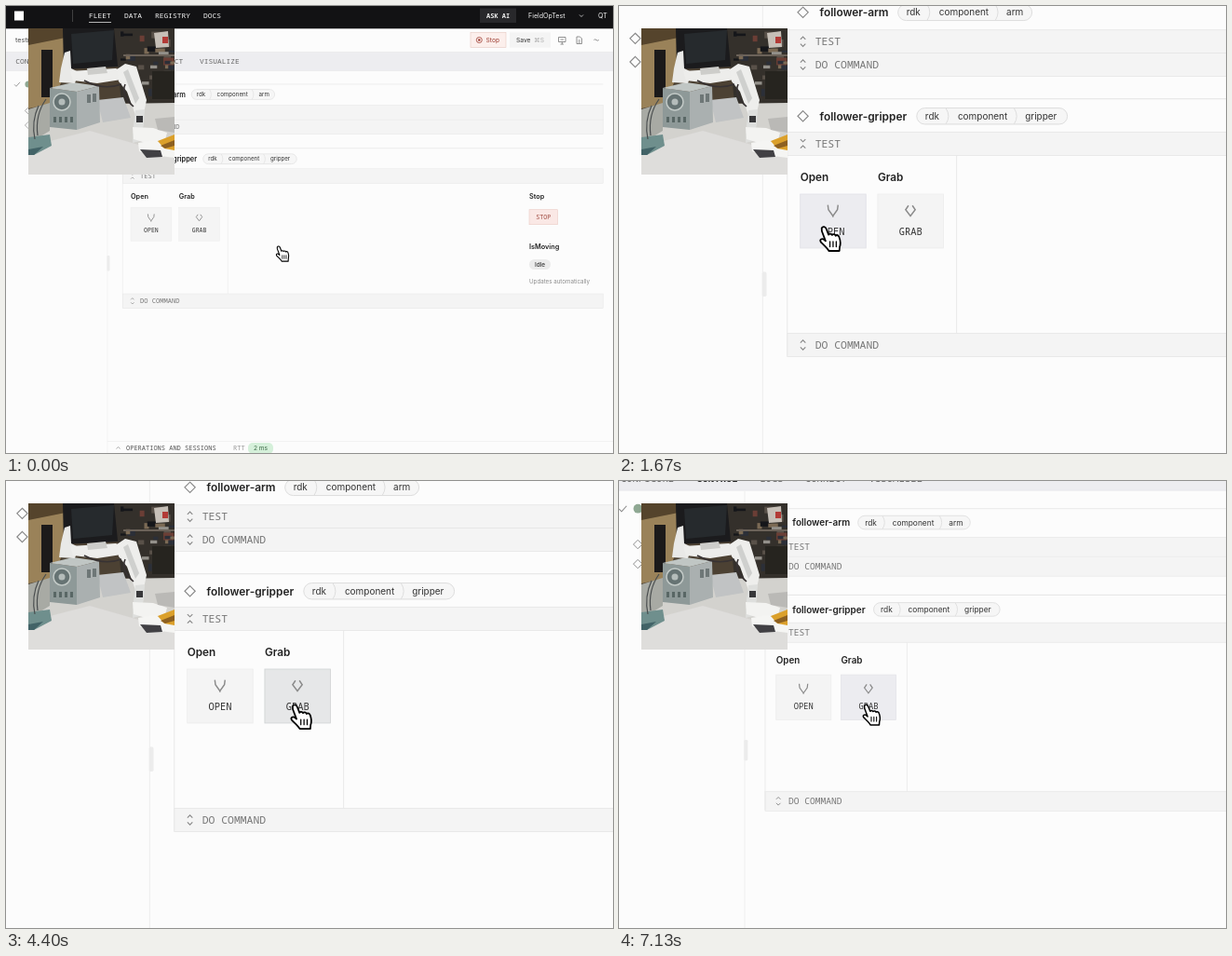
Recreate the animation shown at these times as an HTML page. Size 652 px wide and 480 px high, loop 7190 ms.

```html
<!DOCTYPE html>
<html lang="en">
<head>
<meta charset="utf-8">
<title>Robot gripper control</title>
<style>
  html, body { margin: 0; width: 100%; height: 100%; overflow: hidden; background: #fcfcfc; }
  svg { display: block; width: 652px; height: 480px; }
  .sans { font-family: Inter, "Open Sans", sans-serif; }
  .mono { font-family: "Noto Sans Mono", "DejaVu Sans Mono", monospace; }
  text { white-space: pre; }
</style>
</head>
<body>
<svg id="stage" viewBox="0 0 652 480">
  <rect width="652" height="480" fill="#fcfcfc"/>
  <g id="page"></g>
  <svg id="camera" x="24" y="24" width="157" height="157" viewBox="24 24 157 157"></svg>
  <g id="cursor" stroke="#000" stroke-linejoin="round" stroke-linecap="round">
    <path fill="#fff" stroke-width="1.1" d="M1.8 1.6C2.6 .2 4.3 .6 4.9 2.2L6.4 6C6.9 5.2 8.2 5.2 8.7 6.2C9.3 5.4 10.7 5.6 11.1 6.7C11.9 6 13.2 6.5 13.5 7.6C14.2 9.5 14.6 12 13.8 14.2L13.6 16.8H6.6C5.5 14.6 2.8 12.6 1.2 10.8C.2 9.2 2 8.2 3.3 9.2L4.4 10.2L1.9 3.6Z"/>
    <path fill="none" stroke-width=".8" d="M7.3 10.5V14M9.4 10.5V14M11.5 10.5V14"/>
  </g>
</svg>
<script>
const NS = "http://www.w3.org/2000/svg";
const byId = id => document.getElementById(id);
const page = byId("page"), camera = byId("camera"), cursor = byId("cursor");

function add(parent, tag, attrs, content) {
  const node = document.createElementNS(NS, tag);
  for (const key in attrs) node.setAttribute(key, attrs[key]);
  if (content) node.textContent = content;
  return parent.appendChild(node);
}
const box = (x, y, width, height, fill, more) =>
  add(page, "rect", { x, y, width, height, fill, ...more });
const line = (d, stroke = "#e4e4e4", width = 0.6, more) =>
  add(page, "path", { d, stroke, "stroke-width": width, fill: "none", ...more });

// Text placed by its left edge (or anchor) and the vertical middle of its capitals.
function label(text, x, middle, size, fill, family = "sans", weight = 400, anchor = "start") {
  return add(page, "text", {
    x, y: middle + size * 0.36, "font-size": size, fill, class: family,
    "font-weight": weight, "text-anchor": anchor
  }, text);
}
const mono = (text, x, y, size, fill, weight, anchor) => label(text, x, y, size, fill, "mono", weight, anchor);
const diamond = (x, y) => line(`M${x} ${y - 3.5}l3.5 3.5l-3.5 3.5l-3.5 -3.5z`, "#888", 0.7);

function buildHeader() {
  box(0, -10, 652, 34.3, "#121214");
  box(9, 5.5, 10, 10, "#fff");
  line("M71.5 4V17", "#555", 0.7);
  [["FLEET", 89], ["DATA", 127], ["REGISTRY", 160], ["DOCS", 212]]
    .forEach(([text, x]) => mono(text, x, 10.5, 7.9, "#f4f4f4", 500));
  line("M89 17.5H113", "#ddd", 0.8);
  box(509, 2.5, 39, 15.5, "#28282b");
  mono("ASK AI", 516, 10.5, 7, "#f2f2f2", 600);
  label("FieldOpTest", 561, 10.5, 7.1, "#f2f2f2");
  line("M616 9.5l2 2l2 -2", "#ddd", 0.8);
  label("QT", 636, 10.5, 7.1, "#f2f2f2");
}

function buildToolbar() {
  label("testrigs", 10, 36.5, 7.3, "#555");
  line("M47.5 34l2.5 2.5l-2.5 2.5", "#555", 0.8);
  label("rv204", 54.7, 36.5, 7.3, "#222", "sans", 600);
  box(88, 30, 46, 13.6, "#e0f3e1", { stroke: "#b9dcbc", "stroke-width": 0.6, rx: 1.5 });
  line("M94 39a4 4 0 1 1 5 0M95.3 37.4a2 2 0 1 1 2.4 0M96.5 37V40", "#4d8057", 0.9);
  label("Live", 104.5, 36.8, 7, "#4d8057");
  line("M124.5 35.8l2 2l2 -2", "#4d8057", 0.8);

  box(499, 28.5, 38, 16, "#fcefec", { stroke: "#e6c8c1", "stroke-width": 0.6 });
  add(page, "circle", { cx: 508.3, cy: 36.5, r: 3, fill: "none", stroke: "#9c3a2f", "stroke-width": 0.8 });
  add(page, "circle", { cx: 508.3, cy: 36.5, r: 1.2, fill: "#9c3a2f" });
  label("Stop", 515.5, 36.5, 6.7, "#9c3a2f");
  box(541, 28.5, 44, 16, "#f4f4f4");
  label("Save", 548, 36.5, 6.7, "#333");
  label("⌘S", 567, 36.5, 6.7, "#aaa");
  line("M593.5 33.5H601V38.5H593.5ZM595.5 41H599M597.3 38.5V41M595.5 36H599", "#777", 0.8);
  line("M613 33H616.5L618.5 35V40.5H613ZM614.5 37H617M614.5 39H617", "#777", 0.8);
  line("M631.5 36.5q1.2 -1.4 2.5 0t2.8 0", "#777", 0.8);
}

function buildTabs() {
  box(0, 49.5, 652, 20, "#ededf0");
  line("M0 49.5H652M0 69.5H652", "#e2e2e5", 0.5);
  [["CONFIGURE", 10.2], ["CONTROL", 70.5], ["LOGS", 121], ["CONNECT", 157], ["VISUALIZE", 208]]
    .forEach(([text, x]) => mono(text, x, 59.5, 7.9, text === "CONTROL" ? "#222" : "#666", text === "CONTROL" ? 700 : 400));
}

function buildSidebar() {
  line("M9 84.3l2 2l4 -4.5", "#888", 0.8);
  add(page, "circle", { cx: 24, cy: 84, r: 3.6, fill: "#8fa893" });
  diamond(23.9, 112.4);
  diamond(23.9, 128);
  line("M109 70V480", "#efefef", 0.7);
  box(108.5, 268, 3, 16.5, "#ececec", { rx: 1 });
}

function bar(text, middle, expanded) {
  box(125.3, middle - 7.8, 516, 15.6, "#f4f4f4", { stroke: "#e6e6e6", "stroke-width": 0.5 });
  const y = middle, x = 135.8;
  line(expanded
    ? `M${x - 1.7} ${y - 3}l1.7 1.7l1.7 -1.7M${x - 1.7} ${y + 3}l1.7 -1.7l1.7 1.7`
    : `M${x - 1.7} ${y - 1.5}l1.7 -1.7l1.7 1.7M${x - 1.7} ${y + 1.5}l1.7 1.7l1.7 -1.7`, "#888", 0.7);
  mono(text, 143.9, y, 7.1, "#777");
}

function cardHead(name, api, middle, top, chipX, chipWidth) {
  line(`M125.3 ${top}H641.3`, "#e2e2e2");
  diamond(135.8, middle);
  label(name, 147, middle, 7.4, "#222", "sans", 600);
  box(chipX, middle - 5.4, chipWidth, 10.8, "#f6f6f6", { rx: 5.4, stroke: "#dcdcdc", "stroke-width": 0.6 });
  [["rdk", 5.6], ["component", 27.4], [api, 72.3]]
    .forEach(([text, dx]) => label(text, chipX + dx, middle, 6.2, "#333"));
  [19.5, 65].forEach(dx => line(`M${chipX + dx} ${middle - 5.2}q3.4 5.2 0 10.4`, "#dcdcdc"));
}

function actionButton(title, x, icon) {
  label(title, x, 204.6, 7.3, "#222", "sans", 600);
  const face = box(x, 216.2, 43.8, 36, "#f4f4f4", { "stroke-width": 0.5 });
  line(icon, "#8a8a8a", 0.9, { transform: `translate(${x + 21.8} 227.2)` });
  mono(title.toUpperCase(), x + 21.9, 241, 6.5, "#333", 400, "middle");
  return face;
}

function buildStatus() {
  label("Stop", 562, 204.6, 7.3, "#222", "sans", 600);
  box(562, 218.7, 30.5, 16, "#fae8e5", { stroke: "#ecccc6", "stroke-width": 0.6 });
  mono("STOP", 577.3, 226.8, 6.7, "#a04a40", 400, "middle");
  label("IsMoving", 562, 258.2, 7.3, "#222", "sans", 600);
  box(562, 272, 23, 11, "#ebebeb", { rx: 5.5 });
  label("Idle", 573.5, 277.6, 6.4, "#333", "sans", 500, "middle");
  label("Updates automatically", 562, 296, 6.2, "#8a8a8a");
}

function buildFooter() {
  line("M109 467.5H652", "#ececec");
  line("M118.5 475.5l2 -2l2 2", "#888", 0.7);
  mono("OPERATIONS AND SESSIONS", 129, 474.8, 7, "#555");
  mono("RTT", 244, 474.8, 7, "#999");
  box(260, 469, 27, 12, "#d5f0da", { rx: 5 });
  label("2 ms", 273.5, 474.8, 6.6, "#3c6846", "sans", 400, "middle");
}

function buildCamera() {
  const shape = (points, fill) => add(camera, "polygon", { points, fill });
  const rect = (x, y, width, height, fill) => add(camera, "rect", { x, y, width, height, fill });
  rect(24, 24, 157, 157, "#4c4133");
  shape("24,24 64,24 64,70 50,105 24,110", "#9a8259");
  shape("24,24 64,24 64,34 24,42", "#55442c");
  rect(38, 47, 12, 51, "#1c1a1a");
  shape("61,24 126,24 124,65 62,68", "#1b1b1d");
  shape("70,30 116,26 114,58 72,62", "#262a2d");
  shape("116,24 181,24 181,108 124,104", "#34302b");

  let seed = 11;
  const random = () => (seed = seed * 16807 % 2147483647) / 2147483647;
  const tones = ["#15161a", "#595149", "#7b6a55", "#2b2f38", "#6b3e35", "#93908a"];
  for (let i = 0; i < 34; i++) {
    rect(123 + random() * 54, 26 + random() * 68, 3 + random() * 9, 2 + random() * 6, tones[i % tones.length]);
  }
  shape("159,29 174,27 175,44 161,45", "#c6bfb7");
  rect(168, 33, 6, 7, "#b23b37");
  rect(126, 52, 55, 2, "#6b6259");
  rect(157, 70, 24, 30, "#26241f");

  shape("24,116 48,106 181,104 181,181 24,181", "#d3d2ce");
  shape("24,151 90,134 181,160 181,181 24,181", "#dedddb");
  shape("98,101 126,98 134,120 104,125", "#c1c3c4");
  shape("24,111 47,104 47,134 24,148", "#a8aaa4");
  shape("47,88 76,92 76,133 47,130", "#8e9998");
  shape("76,92 100,86 101,125 76,133", "#aab0b0");
  shape("47,88 72,82 100,86 76,92", "#c0c6c4");
  add(camera, "circle", { cx: 60, cy: 103, r: 9, fill: "#667373", stroke: "#c3cac7", "stroke-width": 1.5 });
  add(camera, "circle", { cx: 60, cy: 103, r: 3.5, fill: "#b4bcba" });
  for (let i = 0; i < 4; i++) rect(51 + i * 6, 119, 3, 6, "#596765");
  rect(87, 95, 4, 9, "#6e7777");
  rect(93, 94, 4, 9, "#6e7777");

  shape("24,141 47,138 49,150 30,160 24,160", "#6f8f8d");
  shape("24,154 40,151 30,160 24,160", "#426367");
  add(camera, "path", { d: "M35 107Q27 124 31 143M43 100Q31 117 34 139", fill: "none", stroke: "#494d4e", "stroke-width": 1.2 });

  shape("57,82 59,67 63,50 69,48 70,67 78,71 74,83", "#e9e9e7");
  shape("69,70 118,67 126,71 124,79 98,83 72,80", "#ededeb");
  shape("87,67 107,65 109,72 88,74", "#cdcdca");
  shape("119,68 128,62 140,65 151,101 148,115 139,117 130,92 121,81", "#eeeeec");
  shape("126,71 131,68 143,99 139,105", "#cfd0ce");
  add(camera, "path", { d: "M84 80Q105 91 124 84M128 84Q123 96 137 108", fill: "none", stroke: "#373233", "stroke-width": 1.6 });
  shape("139,112 149,111 148,127 144,145 136,147 137,128", "#dedfdd");
  rect(140, 118, 7, 7, "#38383a");
  shape("136,130 158,131 173,136 171,144 150,147 137,143", "#f3f3f1");
  shape("142,147 160,144 181,154 181,163 157,160 143,156", "#f5f5f3");
  shape("144,154 166,155 168,162 151,163", "#414044");
  shape("163,145 181,138 181,155 170,153", "#dba02b");
  shape("166,150 181,144 181,150 171,153", "#8d6021");
  shape("160,121 181,119 181,136 163,133", "#bab9b6");
}

buildTabs();
buildSidebar();
cardHead("follower-arm", "arm", 95, 84, 199.2, 89.4);
bar("TEST", 114.5);
bar("DO COMMAND", 129.9);
cardHead("follower-gripper", "gripper", 164.2, 152.7, 211.7, 100.5);
bar("TEST", 182.6, true);
bar("DO COMMAND", 316.8);
line("M125.3 152.7V324M238.3 190.5V309", "#e9e9e9");
const openFace = actionButton("Open", 134, "M-3.4 -3.8L-3 -.6L0 3.6L3 -.6L3.4 -3.8M0 3.6V4.4");
const grabFace = actionButton("Grab", 185.7, "M-1.3 -3.4L-3.2 -.6L0 3.6L3.2 -.6L1.3 -3.4");
buildStatus();
buildToolbar();
buildHeader();
buildFooter();
buildCamera();

const LOOP = 7190, ZOOM = 1.61, PIVOT = { x: 34.5, y: 239.5 };
const ZOOM_TIME = 560, ZOOM_IN = 722, ZOOM_OUT = 6872;
const STOPS = [
  { x: 297, y: 266 },
  { x: 154, y: 246, from: 80, to: 800 },
  { x: 210, y: 248, from: 2600, to: 3180 }
];
const progress = (t, from, to) => Math.min(1, Math.max(0, (t - from) / (to - from)));
const quad = u => u < 0.5 ? 2 * u * u : 1 - 2 * (1 - u) * (1 - u);
const smooth = u => u * u * (3 - 2 * u);

function paintButton(face, hovered, pressed) {
  face.setAttribute("fill", pressed ? "#e6e7e8" : hovered ? "#ececf0" : "#f4f4f4");
  face.setAttribute("stroke", pressed ? "#cfd2d3" : hovered ? "#e0e0e6" : "#ececec");
}

function draw(t) {
  const zoom = quad(progress(t, ZOOM_IN, ZOOM_IN + ZOOM_TIME)) - quad(progress(t, ZOOM_OUT, ZOOM_OUT + ZOOM_TIME));
  const scale = 1 + (ZOOM - 1) * zoom;
  const view = `translate(${PIVOT.x * (1 - scale)} ${PIVOT.y * (1 - scale)}) scale(${scale})`;
  page.setAttribute("transform", view);

  let { x, y } = STOPS[0];
  for (const stop of STOPS.slice(1)) {
    const u = smooth(progress(t, stop.from, stop.to));
    x += (stop.x - x) * u;
    y += (stop.y - y) * u;
  }
  cursor.setAttribute("transform", `${view} translate(${x - 7.5} ${y - 8.7})`);

  const tip = x - 4.5;
  paintButton(openFace, tip < 177.8, t > 820 && t < 1000);
  paintButton(grabFace, tip > 185.7 && tip < 229.5 && t > 2000, t > 4260 && t < 4500);
}

const start = performance.now();
function tick() {
  draw((performance.now() - start) % LOOP);
  requestAnimationFrame(tick);
}
draw(0);
tick();
</script>
</body>
</html>
```
